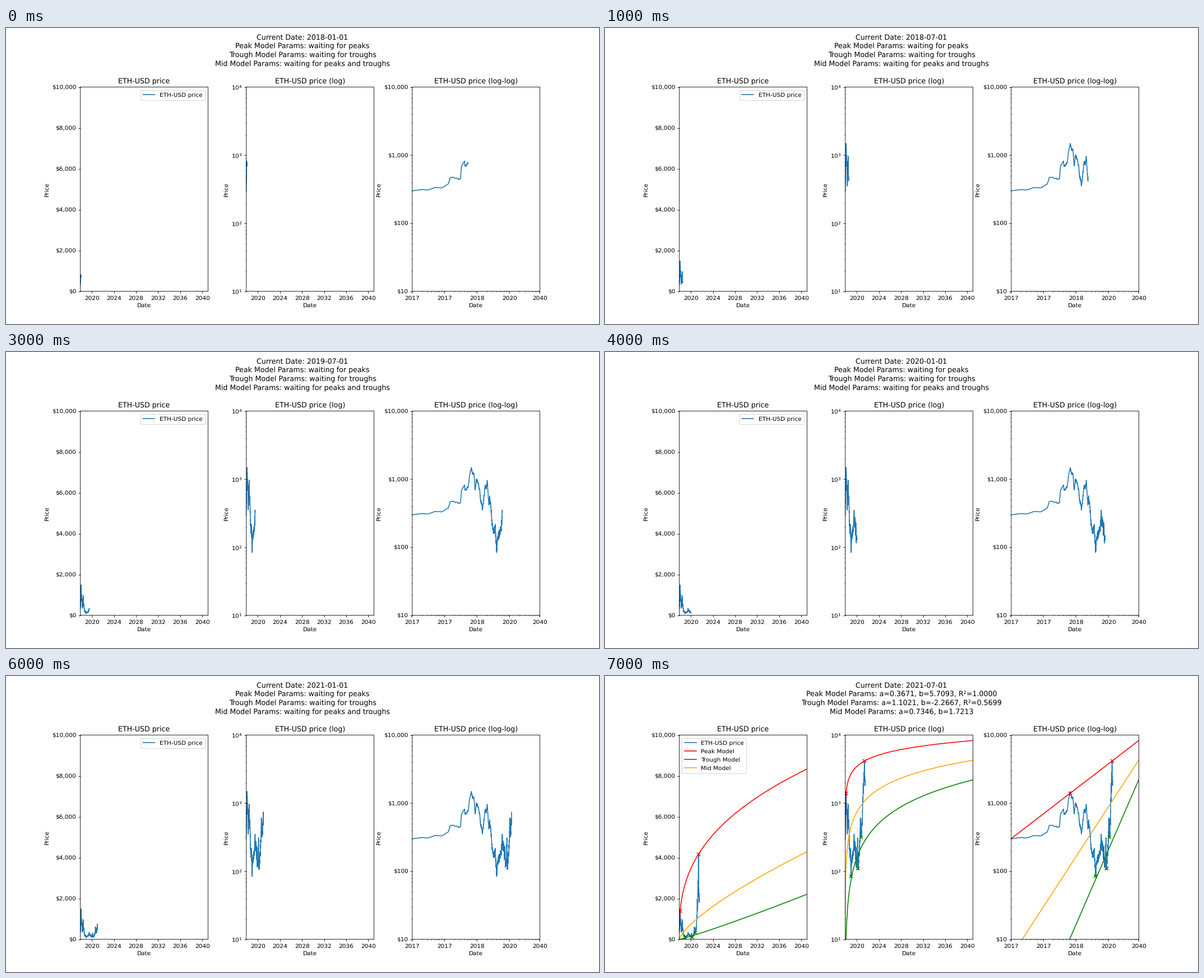
Recreate the animation shown at these times as a matplotlib script. Size 1058 by 529 pixels, loop 8000 ms.

```python
import matplotlib.pyplot as plt
import numpy as np
from matplotlib.animation import FuncAnimation
from matplotlib.ticker import NullFormatter, StrMethodFormatter

WIDTH, HEIGHT = 1058, 529
DPI = WIDTH / 14 + 1e-9
START = np.datetime64("2017-11-09")
LAST_DAY = 8453
FRAMES = 8

# (days since START, price)
PEAKS = [(65, 1396.4), (1279, 4168.7)]
TROUGHS = [(400, 84.3), (858, 110.6), (1049, 321)]
SWINGS = [
    (0, 321), (1, 300), (2, 314), (3, 309), (5, 336), (8, 332), (13, 378),
    (15, 472), (19, 473), (27, 440), (31, 450), (33, 680), (41, 825),
    (43, 690), (53, 770), (80, 1200), (88, 697), (100, 950), (148, 370),
    (177, 816), (232, 422), (256, 480), (307, 190), (362, 218), (515, 175),
    (594, 336), (685, 175), (783, 130), (827, 285), (965, 231), (1027, 477),
    (1149, 740), (1198, 1950), (1207, 1420), (1291, 2110), (1330, 2113),
]
MODELS = [
    ("Peak Model", "red", 0.3671, 5.7093),
    ("Trough Model", "green", 1.1021, -2.2667),
    ("Mid Model", "orange", 0.7346, 1.7213),
]
WAITING = ["waiting for peaks", "waiting for troughs", "waiting for peaks and troughs"]
FIT_QUALITY = [", R²=1.0000", ", R²=0.5699", ""]


def day_of(date):
    return int((np.datetime64(date) - START).astype(int))


def make_prices():
    """Join the turning points in log space with a random walk pinned to them."""
    turn_days, turn_prices = np.array(sorted(PEAKS + TROUGHS + SWINGS)).T
    days = np.arange(turn_days[-1] + 1)
    volatility = 0.042 * np.minimum(1, days / 60)
    walk = np.cumsum(volatility * np.random.default_rng(7).normal(size=len(days)))
    bridge = walk - np.interp(days, turn_days, walk[turn_days.astype(int)])
    trend = np.interp(days, turn_days, np.log(turn_prices))
    return days, np.clip(np.exp(trend + bridge), TROUGHS[0][1], PEAKS[1][1])


days, prices = make_prices()
model_days = np.geomspace(1, LAST_DAY, 1500)

plt.rcParams.update({"font.family": "DejaVu Sans", "text.hinting": "none"})
fig, axes = plt.subplots(1, 3, figsize=(14, 7), dpi=DPI)
fig.subplots_adjust(left=0.125, right=0.9, bottom=0.11, top=0.8, wspace=0.3)
linear, semilog, loglog = axes

headings = [
    fig.text(0.5, 1 - (21 + 15.7 * row) / HEIGHT, "", fontsize=12, ha="center")
    for row in range(4)
]

# The frame sits a fraction of a pixel right of and above the data area.
for ax, suffix in zip(axes, ("", " (log)", " (log-log)")):
    ax.set(title="ETH-USD price" + suffix, xlabel="Date", ylabel="Price")
    for side, spine in ax.spines.items():
        shift = 0.36 if side in ("right", "top") else -0.36
        spine.set_position(("outward", shift))
        spine.set_snap(False)

years = range(2020, 2041, 4)
for ax in (linear, semilog):
    ax.set_xticks([day_of(f"{year}-01-01") for year in years], [str(y) for y in years])
    ax.set_xlim(0, LAST_DAY)
linear.set_ylim(0, 10000)
for ax in (semilog, loglog):
    ax.set_yscale("log")
    ax.set_ylim(10, 10000)
loglog.set_xscale("log")
loglog.set_xticks([1, 10, 100, 1000, LAST_DAY], ["2017", "2017", "2018", "2020", "2040"])
loglog.xaxis.set_minor_formatter(NullFormatter())
loglog.set_xlim(1, LAST_DAY)
for ax in (linear, loglog):
    ax.yaxis.set_major_formatter(StrMethodFormatter("${x:,.0f}"))

price_lines, model_lines, marks = [], [], []
for ax in axes:
    price_lines += ax.plot([], [], color="tab:blue", label="ETH-USD price")
    for name, color, a, b in MODELS:
        curve = np.exp(a * np.log(model_days) + b)
        model_lines += ax.plot(model_days, curve, color=color, label=name)
    for points, color in ((PEAKS, "red"), (TROUGHS, "green")):
        marks += ax.plot(*zip(*points), "x", color=color, markeredgewidth=1.5)


def heading_lines(date, fitted):
    yield f"Current Date: {date}"
    for (name, _, a, b), waiting, quality in zip(MODELS, WAITING, FIT_QUALITY):
        yield f"{name} Params: " + (f"a={a:.4f}, b={b:.4f}{quality}" if fitted else waiting)


def update(frame):
    date = f"{2018 + frame // 2}-{1 + 6 * (frame % 2):02d}-01"
    fitted = frame == FRAMES - 1
    for heading, line in zip(headings, heading_lines(date, fitted)):
        heading.set_text(line)

    end = day_of(date) + 1
    for ax, line in zip(axes, price_lines):
        first = 1 if ax is loglog else 0
        line.set_data(days[first:end], prices[first:end])
    for artist in model_lines + marks:
        artist.set_visible(fitted)

    handles = price_lines[:1] + (model_lines[:3] if fitted else [])
    linear.legend(handles=handles, loc="upper left" if fitted else "upper right")
    return headings + price_lines + model_lines + marks


animation = FuncAnimation(fig, update, frames=FRAMES, interval=1000, repeat=True)
plt.show()
```
